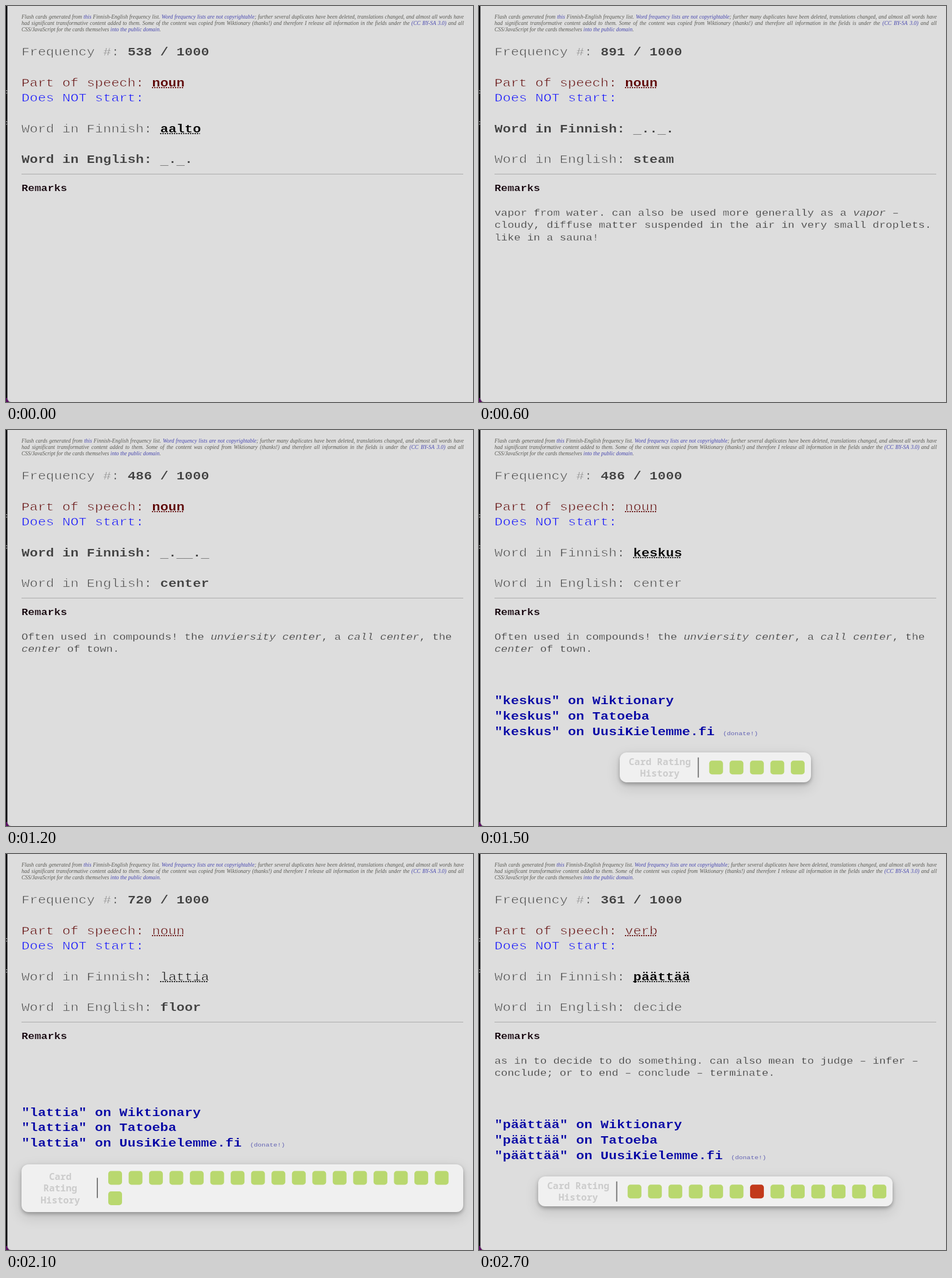
Recreate the animation shown at these times as an HTML page. Size 813 by 689 pixels, loop 3000 ms.

```html
<!DOCTYPE html>
<html lang="en">
<head>
<meta charset="utf-8">
<title>Flash cards</title>
<style>
  html, body { margin: 0; width: 100%; height: 100%; overflow: hidden; background: #ddd; }
  .scene, .edge { position: absolute; left: 0; top: 0; width: 813px; height: 689px; }
  .scene { visibility: hidden; }
  svg { position: absolute; left: 0; top: 0; display: block; }
  svg text { font-family: "Liberation Mono", "Courier New", monospace; white-space: pre; }
  .bold { font-weight: bold; stroke: #ddd; stroke-width: .25px; }
  .thin { stroke: #ddd; stroke-width: .8px; }
  .note { stroke: #ddd; stroke-width: .4px; }
  .note .em { font-style: italic; }
  svg .label { font: bold 16.35px "Noto Sans Mono", monospace; fill: #ccc; text-anchor: middle; }
  .head { position: absolute; left: 27px; top: 14px; width: 770px;
    font: italic 9.46px/11px "Liberation Serif", "Times New Roman", serif; color: #5c5c56; }
  .head div { white-space: nowrap; text-align: justify; text-align-last: justify; }
  .head div:last-child { text-align-last: left; }
  .head b { font-weight: normal; color: #4a4ab0; }
  .panel { position: absolute; border-radius: 12px; background: #f0f0f0;
    box-shadow: 0 3px 6px rgba(0,0,0,.28), 0 8px 24px rgba(0,0,0,.14); }
</style>
</head>
<body>
<svg class="edge" width="813" height="689">
  <rect width="20" height="689" fill="#0a0a0c"/>
  <rect y="682" width="12" height="7" fill="#5a0a62"/>
  <path d="M0 147h2v1h-2zM0 151h2v1h-2zM0 201h2v1h-2zM0 205h2v1h-2z" fill="#ccc"/>
  <rect x="2.5" y="-20" width="840" height="709.5" rx="7" fill="#ddd" stroke="#888"/>
</svg>
<script>
const STEP = 300, LEFT = 27, BIG = 23.67, SMALL = 18.93, CELL = BIG * 0.6;
const LOW = 0.86; // low letterforms, as in a typewriter face
const GREY = '#404040', MAROON = '#5c0000', GREEN = '#b9d86f', RED = '#c23a1c';

const cards = [
  { rank: 538, pos: 'noun', fi: 'aalto', en: 'wave', ask: 'en', blank: '_._.', notes: [], marks: 9 },
  { rank: 891, pos: 'noun', fi: 'höyry', en: 'steam', ask: 'fi', blank: '_.._.', marks: 7, notes: [
    'vapor from water. can also be used more generally as a *vapor* –',
    'cloudy, diffuse matter suspended in the air in very small droplets.',
    'like in a sauna!'] },
  { rank: 486, pos: 'noun', fi: 'keskus', en: 'center', ask: 'fi', blank: '_.__._', marks: 5, notes: [
    'Often used in compounds! the *unviersity center*, a *call center*, the',
    '*center* of town.'] },
  { rank: 720, pos: 'noun', fi: 'lattia', en: 'floor', ask: 'en', blank: '__.._', notes: [], marks: 18 },
  { rank: 361, pos: 'verb', fi: 'päättää', en: 'decide', ask: 'fi', blank: '_..__..', marks: 13, miss: 6, notes: [
    'as in to decide to do something. can also mean to judge – infer –',
    'conclude; or to end – conclude – terminate.'] },
];

const text = (x, y, str, fill, cls = '', size = BIG) =>
  `<text transform="translate(${x} ${y}) scale(1 ${LOW})" font-size="${size}" fill="${fill}" class="${cls}">${str}</text>`;

const col = n => LEFT + n * CELL;
const weight = bold => bold ? 'bold' : 'thin';

const dots = (x, y, chars, color) =>
  `<path d="M${x} ${y + 2.5}h${chars * CELL - 2}" stroke="${color}" stroke-width="2" stroke-dasharray="2 2"/>`;

function header(many) {
  return `<div class="head">
    <div>Flash cards generated from <b>this</b> Finnish-English frequency list. <b>Word frequency lists are not copyrightable</b>; further ${many ? 'many' : 'several'} duplicates have been deleted, translations changed, and almost all words have</div>
    <div>had significant transformative content added to them. Some of the content was copied from Wiktionary (thanks!) and therefore ${many ? 'all information in the fields is' : 'I release all information in the fields'} under the <b>(CC BY-SA 3.0)</b> and all</div>
    <div>CSS/JavaScript for the cards themselves <b>into the public domain</b>.</div></div>`;
}

// One "Word in ...:" row; hidden words show consonants as _ and vowels as .
function wordRow(y, name, word, blank, bold, linked) {
  const label = text(LEFT, y, `Word in ${name}:`, GREY, weight(blank));
  if (blank) {
    return label + [...blank].map((c, i) => c === '_'
      ? text(col(17 + i), y + 2.5, c, '#777')
      : text(col(17 + i), y, c, GREY, 'bold')).join('');
  }
  const color = linked ? '#000' : GREY;
  return label + text(col(17), y, word, color, weight(bold)) +
    (linked ? dots(col(17), y, word.length, color) : '');
}

function links(word, y) {
  const site = (name, i) =>
    text(LEFT, y + i * 26.8, `"${word}" on ${name}`, '#0000a4', 'bold');
  const end = word.length + 21;
  return ['Wiktionary', 'Tatoeba', 'UusiKielemme.fi'].map(site).join('') +
    text(col(end + 1), y + 53.6, '(donate!)', '#6464b4', '', 11.35);
}

function history(card, top) {
  const wide = card.marks > 17;
  const h = wide ? 83 : 52.5, w = wide ? 769 : 155 + 35.5 * card.marks;
  const x = 411.5 - w / 2, mid = top + h / 2;
  const lines = wide ? ['Card', 'Rating', 'History'] : ['Card Rating', 'History'];
  const first = x + (wide ? 151 : 155.5), bar = x + (wide ? 132 : 136.5);
  const rowTop = wide ? top + 12 : mid - 12;
  let art = lines.map((s, i) =>
    `<text class="label" x="${x + (wide ? 67.5 : 69.5)}" y="${mid + 6 + (i - (lines.length - 1) / 2) * 20.5}">${s}</text>`).join('');
  art += `<rect x="${bar - 1}" y="${mid - 17.5}" width="2" height="35" fill="#777"/>`;
  for (let i = 0; i < card.marks; i++) {
    art += `<rect x="${first + i % 17 * 35.53}" y="${rowTop + Math.floor(i / 17) * 35.5}" width="24" height="24" rx="5" fill="${i === card.miss ? RED : GREEN}"/>`;
  }
  return { art, panel: `<div class="panel" style="left:${x}px;top:${top}px;width:${w}px;height:${h}px"></div>` };
}

function scene(card, back) {
  const askFi = card.ask === 'fi';
  const hide = lang => !back && card.ask === lang ? card.blank : '';
  const shift = Math.max(0, card.notes.length - 1) * 21.45;
  let art = text(LEFT, 85.5, 'Frequency #:', GREY, 'thin') +
    text(col(13), 85.5, card.rank + ' / 1000', GREY, 'bold') +
    text(LEFT, 139.5, 'Part of speech:', MAROON, 'thin') +
    text(col(16), 139.5, card.pos, MAROON, weight(!back)) +
    dots(col(16), 139.5, 4, MAROON) +
    text(LEFT, 166, 'Does NOT start:', '#00f', 'thin') +
    wordRow(219.5, 'Finnish', card.fi, hide('fi'), !back || askFi, true) +
    wordRow(273, 'English', card.en, hide('en'), !back || !askFi, false) +
    `<path d="M27 292.5H796" stroke="#a9a9a9"/>` +
    text(LEFT, 322, 'Remarks', '#12000a', 'bold', SMALL);
  card.notes.forEach((line, i) => {
    const str = line.replace(/\*(.+?)\*/g, '<tspan class="em">$1</tspan>');
    art += text(LEFT, 365 + i * 21.45, str, '#333', 'note', SMALL);
  });
  let panel = '';
  if (back) {
    const box = history(card, 539.5 + shift);
    art += links(card.fi, 455.5 + shift) + box.art;
    panel = box.panel;
  }
  const el = document.createElement('div');
  el.className = 'scene';
  el.innerHTML = header(askFi && !back) + panel + `<svg width="813" height="689">${art}</svg>`;
  document.body.append(el);
  return el;
}

const scenes = cards.flatMap(c => [scene(c, false), scene(c, true)]);
const start = performance.now();

function draw() {
  const t = Math.max(0, performance.now() - start);
  const now = Math.floor(t / STEP) % scenes.length;
  scenes.forEach((el, i) => { el.style.visibility = i === now ? 'visible' : 'hidden'; });
  requestAnimationFrame(draw);
}
draw();
</script>
</body>
</html>
```
